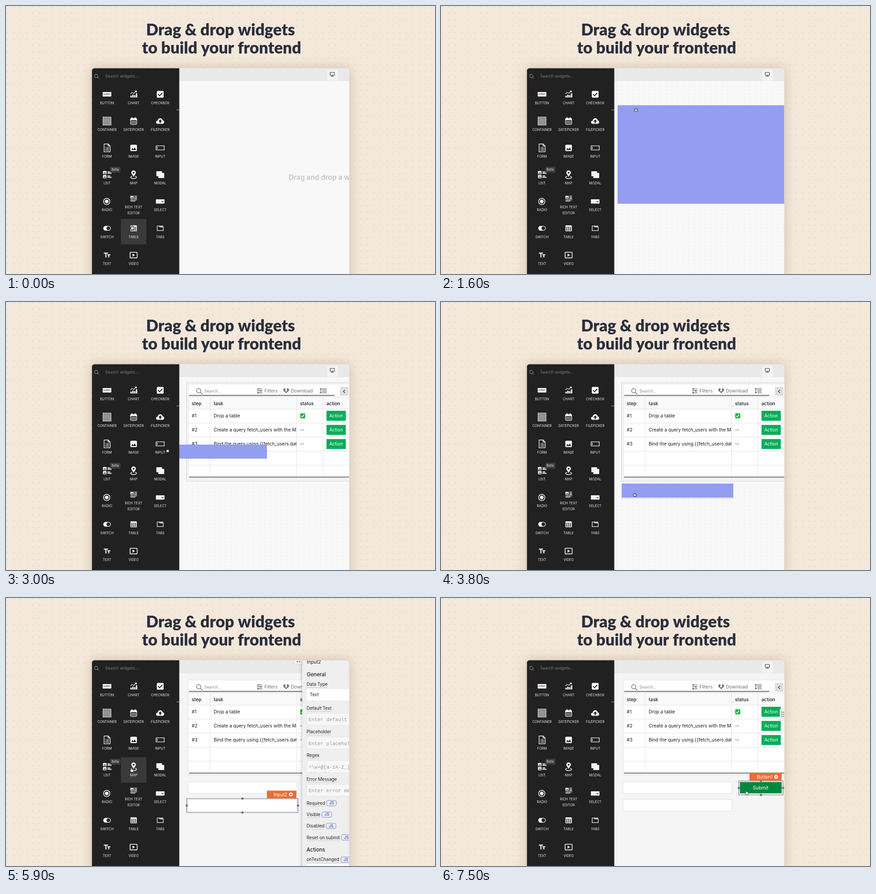
An HTML page with a canvas that plays this animation: 947x592 px, repeating every 9500 ms.

```html
<!DOCTYPE html>
<html lang="en">
<head>
<meta charset="utf-8">
<title>Drag &amp; drop widgets</title>
<style>
html, body { margin: 0; width: 100%; height: 100%; overflow: hidden; background: #f3e8da; }
canvas { display: block; width: 947px; height: 592px; }
</style>
</head>
<body>
<canvas id="stage"></canvas>
<script>
const W = 947, H = 592, LOOP = 9500, STEP = 100;
const canvas = document.getElementById('stage');
const dpr = window.devicePixelRatio || 1;
canvas.width = W * dpr;
canvas.height = H * dpr;
const c = canvas.getContext('2d');

const SANS = 'Inter, "Noto Sans", sans-serif';
const MONO = '"Liberation Mono", monospace';
const DARK = '#212121', LIGHT = '#f4f4f4', SLATE = '#66758a', GREEN = '#04ae58';

// ---- helpers ----
function rect(x, y, w, h, fill, r = 0) {
  c.fillStyle = fill;
  c.beginPath();
  c.roundRect(x, y, w, h, r);
  c.fill();
}
function frame(x, y, w, h, color, lw = 1, r = 0, dash = []) {
  c.strokeStyle = color;
  c.lineWidth = lw;
  c.setLineDash(dash);
  c.beginPath();
  c.roundRect(x, y, w, h, r);
  c.stroke();
  c.setLineDash([]);
}
function dot(x, y, r, fill) {
  c.fillStyle = fill;
  c.beginPath();
  c.arc(x, y, r, 0, 7);
  c.fill();
}
function text(s, x, y, size, color, { weight = 400, align = 'left', family = SANS } = {}) {
  c.font = `${weight} ${size}px ${family}`;
  c.fillStyle = color;
  c.textAlign = align;
  c.textBaseline = 'alphabetic';
  c.fillText(s, x, y + size * 0.36);
}
const fill = (d, color = LIGHT) => { c.fillStyle = color; c.fill(new Path2D(d)); };
function stroke(d, color = LIGHT, lw = 1.3) {
  c.strokeStyle = color;
  c.lineWidth = lw;
  c.lineJoin = 'round';
  c.stroke(new Path2D(d));
}
function at(x, y, draw) {
  c.save();
  c.translate(x, y);
  draw();
  c.restore();
}
function track(keys, t) {
  let a = keys[0];
  for (const b of keys) {
    if (t <= b[0]) {
      const k = b[0] > a[0] ? (t - a[0]) / (b[0] - a[0]) : 0;
      return [a[1] + (b[1] - a[1]) * k, a[2] + (b[2] - a[2]) * k];
    }
    a = b;
  }
  return [a[1], a[2]];
}

// ---- motion ----
const cursorKeys = [
  [0, 279, 490], [1000, 279, 490], [1100, 345, 410], [1200, 433, 301], [1500, 431, 240],
  [1800, 429, 209], [2000, 429, 209], [2200, 373, 285], [2600, 373, 285], [2700, 345, 314],
  [2900, 345, 314], [3600, 428, 417], [3700, 428, 420], [3800, 428, 426], [4100, 428, 426],
  [4400, 343, 331], [4800, 343, 331], [4900, 345, 335], [5300, 402, 447], [5400, 402, 447],
  [5600, 428, 466], [5900, 278, 380], [6200, 226, 203], [6400, 226, 203], [7000, 505, 306],
  [7100, 505, 306], [7200, 647, 430], [7300, 647, 430], [7400, 675, 430]
];
const ghostKeys = [
  [1100, 324, 395], [1200, 361, 343], [1500, 385, 240], [1800, 399, 178], [2900, 399, 178],
  [3000, 330, 315], [3600, 399, 392], [3800, 399, 401], [4900, 399, 401],
  [5000, 330, 330], [5300, 374, 424], [5400, 374, 424], [5600, 399, 441], [6400, 399, 441],
  [6500, 232, 188], [7000, 487, 281], [7100, 487, 281], [7200, 629, 405]
];
const drags = [
  { from: 1100, to: 2000, w: 394, h: 217.5 },
  { from: 3000, to: 4100, w: 246, h: 31 },
  { from: 5000, to: 5600, w: 246, h: 31 },
  { from: 6500, to: 7400, w: 98, h: 31 }
];

// ---- widget icons, centred on 0,0 ----
const icons = {
  BUTTON() {
    rect(-9.5, -5, 19, 10, LIGHT, 1);
    text('SUBMIT', 0, 0, 4, '#444', { weight: 600, align: 'center' });
  },
  CHART() {
    fill('M-7 3h3v4h-3zM-3 1h3v6h-3zM1 2h3v5h-3zM5-2h3v9h-3z');
    stroke('M-7-1L-3-4L0-2L6-7M2.5-7.3H6.3V-3.5', LIGHT, 1.2);
  },
  CHECKBOX() {
    rect(-7.5, -7.5, 15, 15, LIGHT, 2);
    stroke('M-4.5 0L-1.3 3.2L4.7-3', DARK, 1.8);
  },
  CONTAINER() {
    rect(-9, -9, 18, 18, '#929292');
    frame(-9, -9, 18, 18, LIGHT, 1.3, 0, [2, 1.2]);
  },
  DATEPICKER() {
    frame(-6.8, -6, 13.6, 13.4, LIGHT, 1.3, 1.5);
    fill('M-7-6H7V-2H-7zM-4.5-8.5h2v4h-2zM2.5-8.5h2v4h-2z');
    for (let i = 0; i < 6; i++) rect(-4.7 + (i % 3) * 3.6, 0 + (i > 2 ? 3.4 : 0), 2.2, 2, LIGHT);
  },
  FILEPICKER() {
    fill('M-5 6C-11 6-10-1-5.5-1C-4.5-8 5-7.5 5.4-1.8C10-1.6 10 6 5 6Z');
    fill('M0-3.5L4 .7H1.4V4H-1.4V.7H-4Z', DARK);
  },
  FORM() {
    stroke('M-6.5-8.7H2.5L6.8-4.3V8.7H-6.5ZM2.3-8.5V-4H6.6', LIGHT, 1.4);
    for (const y of [-1, 2, 5]) fill(`M-4 ${y}h1.3v1.3h-1.3zM-1.7 ${y}h6v1.3h-6z`);
  },
  IMAGE() {
    rect(-7.3, -7, 14.6, 14, LIGHT, 2);
    fill('M-5.4 4.5L-2.3 .4L0 3L2.6-.8L5.6 4.5Z', DARK);
  },
  INPUT() {
    frame(-9, -4.5, 18, 9, LIGHT, 1.4, .5);
    fill('M-7-2.4h1.3v4.8h-1.3z');
  },
  LIST() {
    for (const y of [-8, 1]) {
      rect(-9, y, 8, 7, LIGHT, 1);
      fill(`M-8 ${y + 5.5}l2-2.5l1.5 1.5l1.2-1.5l1.3 2.5z`, DARK);
      fill(`M1 ${y + .8}h6v2h-6zM1 ${y + 4}h9v2h-9z`);
    }
  },
  MAP() {
    fill('M0 5.5C-2-.5-5-1-5-4.3A5 5 0 0 1 5-4.3C5-1 2-.5 0 5.5Z');
    dot(0, -4.2, 1.9, DARK);
    stroke('M-3.4 3.4C-9 5 -6 8.7 0 8.7S9 5 3.4 3.4', LIGHT, 1.5);
  },
  MODAL() {
    rect(-8.5, -7.5, 12.5, 11, LIGHT);
    rect(-4.2, -3.8, 13, 11.3, LIGHT);
  },
  RADIO() {
    c.translate(-.6, 0);
    dot(0, 0, 7.7, LIGHT);
    dot(0, 0, 6.2, DARK);
    dot(0, 0, 4, LIGHT);
  },
  'RICH TEXT'() {
    rect(-7, -6, 7, 6.5, LIGHT, .5);
    fill('M-6-.7l1.7-2.3l1.2 1.2l1-1l1.3 2.1z', DARK);
    fill('M1.5-6h6v1.3h-6zM1.5-3.3h6v1.3h-6zM1.5-.7h6v1.3h-6zM-7 2.2H7.5v1.3H-7zM-7 4.8H4v1.3H-7z');
  },
  SELECT() {
    rect(-9.5, -4.8, 19, 9.6, LIGHT, 1);
    stroke('M3-1L5 1L7-1', DARK, 1.1);
  },
  SWITCH() {
    rect(-8.3, -5.3, 16.6, 10.6, LIGHT, 5.3);
    dot(3, 0, 4, DARK);
  },
  TABLE() {
    rect(-7, -6.5, 14, 13, LIGHT, 1);
    for (let i = 0; i < 9; i++) rect(-5.5 + (i % 3) * 4, -2.8 + Math.floor(i / 3) * 3, 2.8, 1.8, DARK);
  },
  TABS() {
    stroke('M-6.7-5.2H1L2-3H6.7V5.2H-6.7ZM-1.5-5V-3H2M2-5.2H5.5L6.6-3', LIGHT, 1.3);
  },
  TEXT() {
    stroke('M-7-4.4H2M-2.5-4.4V5.4M.4-.7H7.4M4-.7V5.4', LIGHT, 2.2);
  },
  VIDEO() {
    frame(-7.8, -6.2, 15.6, 12.4, LIGHT, 1.6, 1);
    fill('M-2.2-3.2L3 0L-2.2 3.2Z');
  }
};
const names = Object.keys(icons);
const slot = i => [223 + (i % 3) * 58.7, 195 + Math.floor(i / 3) * 59.2];

// ---- scene ----
function backdrop() {
  rect(0, 0, W, H, '#f3e8da');
  c.fillStyle = '#e2d3c1';
  for (let y = 1.5; y < H; y += 14.2)
    for (let x = 3; x < W; x += 14.2) {
      c.beginPath();
      c.arc(x, y, 1.1, 0, 7);
      c.fill();
    }
  const title = { weight: 900, align: 'center', family: 'Lato, "Open Sans", sans-serif' };
  text('Drag & drop widgets', 473.5, 52, 35.5, '#2a2f3d', title);
  text('to build your frontend', 476, 92, 35.5, '#2a2f3d', title);
  c.save();
  c.shadowColor = 'rgba(110, 80, 40, .28)';
  c.shadowBlur = 24 * dpr;
  rect(190, 137.5, 567.5, 480, '#f7f7f7', 6);
  c.restore();
}

function sidebar(cursor, dragging) {
  rect(189.5, 137, 193, 456, DARK);
  c.strokeStyle = '#8b8b8b';
  c.lineWidth = 1.2;
  c.beginPath();
  c.arc(199.2, 154.5, 3.6, 0, 7);
  c.moveTo(201.8, 157.2);
  c.lineTo(204.6, 160);
  c.stroke();
  text('Search widgets...', 219, 155, 9, '#7b7b7b');
  rect(376, 229, 6.5, 1, '#b5b5b5');
  names.forEach((name, i) => {
    const [x, y] = slot(i);
    const top = y - 20.5;
    const inside = Math.abs(cursor[0] - x) < 28 && cursor[1] > top && cursor[1] < top + 56;
    if (inside && !dragging) rect(x - 28, top, 56, 56, '#3a3a3a');
    const rich = name === 'RICH TEXT';
    at(x, rich ? y - 6.5 : y, icons[name]);
    const label = { align: 'center' };
    text(name, x, rich ? y + 12.7 : y + 19, 7.4, '#ececec', label);
    if (rich) text('EDITOR', x, y + 25.5, 7.4, '#ececec', label);
  });
  rect(230, 355, 22.5, 13, '#3d3d3d', 1.5);
  text('Beta', 241, 361.5, 7.5, '#dedede', { align: 'center' });
}

function topbar() {
  rect(382, 137, 376, 29, '#e9e9e9');
  rect(709, 140.5, 24, 24.5, '#f3f3f3');
  frame(715.5, 146.8, 9.4, 6.2, '#333', 1.1, .5);
  rect(719.6, 153, 1.2, 2, '#333');
  rect(717, 154.7, 6.4, 1.1, '#333');
}

function gridDots() {
  c.fillStyle = '#dcdcdc';
  for (let y = 170.2; y < H; y += 7.8)
    for (let x = 386.7; x < 758; x += 12.3) c.fillRect(x - .5, y - .5, 1.1, 1.1);
}

function outline(x, y, w, h) {
  frame(x, y, w, h, SLATE, 1.2);
  for (const [px, py] of [[x + w / 2, y], [x, y + h / 2], [x + w, y + h / 2], [x + w / 2, y + h]])
    dot(px, py, 2.5, SLATE);
}

function gear(x, y) {
  at(x, y, () => {
    for (let i = 0; i < 4; i++) {
      rect(-1.1, -4.6, 2.2, 9.2, '#fff', .5);
      c.rotate(Math.PI / 4);
    }
    dot(0, 0, 3.4, '#fff');
    dot(0, 0, 1.5, '#ee6b35');
  });
}

function tag(label, left, right, bottom) {
  rect(left, bottom - 17.5, right - left, 17, '#ee6b35');
  text(label, right - 20, bottom - 9, 10.2, '#fff', { align: 'right' });
  gear(right - 12.2, bottom - 9);
}

function skeleton() {
  rect(399, 178, 394, 218, '#eceeee');
  outline(399, 178, 394, 218);
  rect(724, 396, 60, 16.5, '#2d343b');
  text('Table1', 738, 404, 10.4, '#fff');
}

function toolbar() {
  const gray = '#6e6e6e';
  c.strokeStyle = gray;
  c.lineWidth = 1.4;
  c.beginPath();
  c.arc(425.5, 196, 4.7, 0, 7);
  c.moveTo(429, 199.5);
  c.lineTo(433, 203.3);
  c.stroke();
  text('Search...', 438, 197, 9, '#8a8a8a');
  at(560, 196.3, () => {
    stroke('M-6-4.2H6M-6 0H6M-6 4.2H6', gray, 1.4);
    for (const [x, y] of [[-3, -4.2], [2.5, 0], [-3, 4.2]]) dot(x, y, 1.7, gray);
  });
  text('Filters', 570.5, 196.5, 10, gray);
  at(618.5, 196, () => {
    fill('M0 5.2L-5.5 .5C-8-3-4-7-1.5-4.5V-1H-3.5L0 2.3L3.5-1H1.5V-4.5C4-7 8-3 5.5 .5Z', gray);
  });
  text('Download', 629, 196.5, 10.2, gray);
  at(700, 196, () => {
    stroke('M-2-4.6H8M-2-1.5H8M-2 1.6H8M-2 4.7H8M-5-5V5M-7.2-3L-5-5.4L-2.8-3M-7.2 3L-5 5.4L-2.8 3', gray, 1.3);
  });
  rect(404, 205, 321, 2.8, '#8f8f8f', 1);
  rect(737, 187.5, 19, 19.5, '#dedede');
  at(746.5, 197.5, () => stroke('M1.7-3.4L-1.7 0L1.7 3.4', '#333', 1.3));
}

function cell(s, x, y, w) {
  c.save();
  c.beginPath();
  c.rect(x, y - 10, w, 20);
  c.clip();
  text(s, x, y, 10.15, '#1c1c1c');
  c.restore();
}

function table() {
  rect(402, 181, 380, 210, '#fff');
  toolbar();
  rect(402, 209, 380, 27, '#f8f9fb');
  for (const y of [209, 236, 267, 298, 329, 360]) rect(402, y, 380, 1, '#e4e4e4');
  for (const x of [450, 641, 699]) rect(x, 209, 1, 177, '#e4e4e4');
  frame(402, 181, 380, 210, '#dcdcdc');
  [['step', 410], ['task', 458.5], ['status', 649], ['action', 707.5]]
    .forEach(([s, x]) => text(s, x, 224, 10.3, '#1c1c1c', { weight: 500 }));
  const tasks = ['Drop a table', 'Create a query fetch_users with the Mock API',
    'Bind the query using {{fetch_users.data}}'];
  tasks.forEach((task, i) => {
    const y = 251.3 + i * 31.2;
    cell('#' + (i + 1), 410, y, 38);
    cell(task, 458.5, y, 182.5);
    if (i) cell('--', 649, y, 40);
    rect(707.5, y - 11, 42.5, 22, GREEN);
    text('Action', 728.8, y, 10, '#fff', { align: 'center' });
  });
  rect(649.5, 246, 11, 11, '#18b33c', 1.5);
  at(655, 251.5, () => stroke('M-3 .2L-1 2.6L3-3', '#fff', 1.7));
  rect(404, 385.5, 370, 2.8, '#8f8f8f', 1);
}

function inputBox(y) {
  rect(402, y, 240, 25, '#fff');
  frame(402, y, 240, 25, '#e0e0e0');
}

function jsBadge(x, y) {
  frame(x, y - 6, 21.5, 12, '#7286d8', 1, 3);
  text('JS', x + 10.8, y, 8.6, '#4c63c4', { weight: 600, align: 'center' });
}

function pane(title) {
  rect(637, 137, 17, 10, '#f3f3f3');
  frame(637, 130, 17, 17, '#d8d8d8');
  dot(643, 140.5, 1.3, '#777');
  dot(648, 140.5, 1.3, '#777');
  c.save();
  c.shadowColor = 'rgba(0, 0, 0, .28)';
  c.shadowBlur = 8 * dpr;
  rect(654, 130, 120, 480, '#efefef');
  c.restore();
  const ink = '#222';
  text(title, 664, 141, 10.4, ink);
  text('General', 664, 168.5, 11.3, ink, { weight: 500 });
  const label = (s, y) => {
    text(s, 663.5, y, 9.7, ink);
    const w = c.measureText(s).width;
    c.fillStyle = '#aaa';
    for (let x = 664; x < 663.5 + w; x += 2) c.fillRect(x, y + 6.5, 1, 1);
    return 663.5 + w;
  };
  label('Data Type', 190.5);
  rect(664, 201.5, 100, 24.5, '#fff');
  text('Text', 670.5, 214, 9.7, ink);
  const fields = [['Default Text', 'Enter default text'], ['Placeholder', 'Enter placeholder'],
    ['Regex', '^\\w+@[a-zA-Z_]+?\\.'], ['Error Message', 'Enter error message']];
  fields.forEach(([name, hint], i) => {
    const y = 243.5 + i * 52.2;
    label(name, y);
    rect(664, y + 11.3, 100, 26.5, '#f7f7f7');
    frame(664, y + 11.3, 100, 26.5, '#e4e4e4');
    c.save();
    c.beginPath();
    c.rect(664, y + 11.3, 100, 26);
    c.clip();
    text(hint, 668, y + 25, 10.9, '#9a9a9a', { family: MONO });
    if (i === 2) text('/^\\w+@/', 668, y + 40, 10.9, '#9a9a9a', { family: MONO });
    c.restore();
  });
  ['Required', 'Visible', 'Disabled', 'Reset on submit']
    .forEach((s, i) => jsBadge(label(s, 453.5 + i * 25.2) + 3.5, 453.2 + i * 25.2));
  text('Actions', 663.5, 555.5, 11.3, ink, { weight: 500 });
  jsBadge(label('onTextChanged', 578) + 4, 578);
  rect(664, 588.5, 100, 10, '#fff');
}

function submitButton(t) {
  rect(660, 406.5, 92, 25, '#03873f');
  text('Submit', 705.5, 419, 10.5, '#fff', { align: 'center' });
  outline(657.5, 404, 97.5, 31);
  tag('Button1', 681, 752, 404);
  if (t < 7500) return;
  rect(748, 245, 12, 25, '#f0f0f0', 2);
  frame(748, 245, 12, 25, '#dedede', 1, 2);
  for (let i = 0; i < 6; i++) dot(752.5 + (i % 2) * 3.6, 252.5 + Math.floor(i / 2) * 4.7, 1.2, '#777');
}

function pointer([x, y], dragging, open) {
  at(x, y, () => {
    if (dragging || open) {
      const d = open
        ? 'M-2.6 4L-4.6 .2Q-4-1-2.8 0L-3-3Q-2-4.2-1.4-2.6Q-.7-5 .3-3.2Q1.7-4.4 2-2.4Q3.5-3 3.6-1V1.5L2.6 4Z'
        : 'M-2.4 3.4L-3.6 .4Q-3.8-1-2.6-1Q-2.6-2.8-1.2-2.4Q0-3.4 1-2.4Q2.3-3 2.6-1.8Q3.8-1.6 3.5 .4L2.5 3.4Z';
      fill(d, '#fff');
      stroke(d, '#222', 1.1);
      stroke('M-1 1V-.8M.5 1V-.8M2 1V-.8', '#222', .6);
      return;
    }
    const d = 'M-2.4-4V.8L-3.5-.3Q-4.7 0-4 1.2L-1.8 4.8H2.8L3.7 2V-.6Q3.4-1.4 2.5-1Q2-1.8 1.1-1.4Q.4-2-.5-1.4V-4Q-1.5-5.2-2.4-4Z';
    fill(d, '#fff');
    stroke(d, '#222', .9);
  });
}

function canvasArea(t, drag) {
  rect(382, 165.5, 376, 430, t >= 4100 && !drag ? '#f5f5f5' : '#f8f8f8');
  if (t < 1100) text('Drag and drop a widget here', 624, 378.5, 15.4, '#c5c5c5', { weight: 600 });
  if (drag) gridDots();
  if (t >= 2000 && t < 2100) skeleton();
  if (t >= 2100) {
    table();
    if (t < 2700) outline(399, 178, 394, 218);
    if (t >= 4300 && t < 5000) outline(399, 178, 394, 218);
    if (drag) frame(398.5, 178, 394, 217.5, '#a9b0e6', 1, 0, [2, 1.5]);
  }
  const first = t >= 4100, second = t >= 5600;
  if (first) {
    inputBox(406.5);
    if (drag) frame(399, 404, 246, 31, '#a9b0e6', 1, 0, [2, 1.5]);
    if (t < 5000) {
      outline(399, 404, 245.5, 31);
      tag('Input1', 577.5, 641, 404);
    }
  }
  if (second) {
    inputBox(445.5);
    if (drag) frame(399, 443, 246, 31, '#a9b0e6', 1, 0, [2, 1.5]);
    if (t < 6500) {
      outline(399, 443, 245.5, 31);
      tag('Input2', 576, 641, 443);
    }
  }
  if (t >= 7400) submitButton(t);
  if (drag) {
    const [x, y] = track(ghostKeys, t);
    if (drag.h < 40 && t >= 3600 && t < 4100) frame(399, 403, 246, 30.5, '#a9b0e6', 1, 0, [2, 1.5]);
    rect(x, y, drag.w, drag.h, '#939df2');
  }
}

function draw(t) {
  c.setTransform(dpr, 0, 0, dpr, 0, 0);
  const drag = drags.find(d => t >= d.from && t < d.to);
  const cursor = track(cursorKeys, t);
  backdrop();
  c.save();
  c.beginPath();
  c.roundRect(189.5, 137.5, 568, 480, 6);
  c.clip();
  canvasArea(t, drag);
  topbar();
  if (t >= 4100 && t < 5000) pane('Input1');
  if (t >= 5600 && t < 6500) pane('Input2');
  sidebar(cursor, drag);
  pointer(cursor, drag, t <= 1000 || (t >= 2000 && t < 2200));
  c.restore();
}

let shown = -1;
const start = performance.now();
function tick() {
  const ms = (performance.now() - start) % LOOP;
  const t = Math.floor(ms / STEP) * STEP;
  if (t !== shown) draw(shown = t);
  requestAnimationFrame(tick);
}
tick();
</script>
</body>
</html>
```
